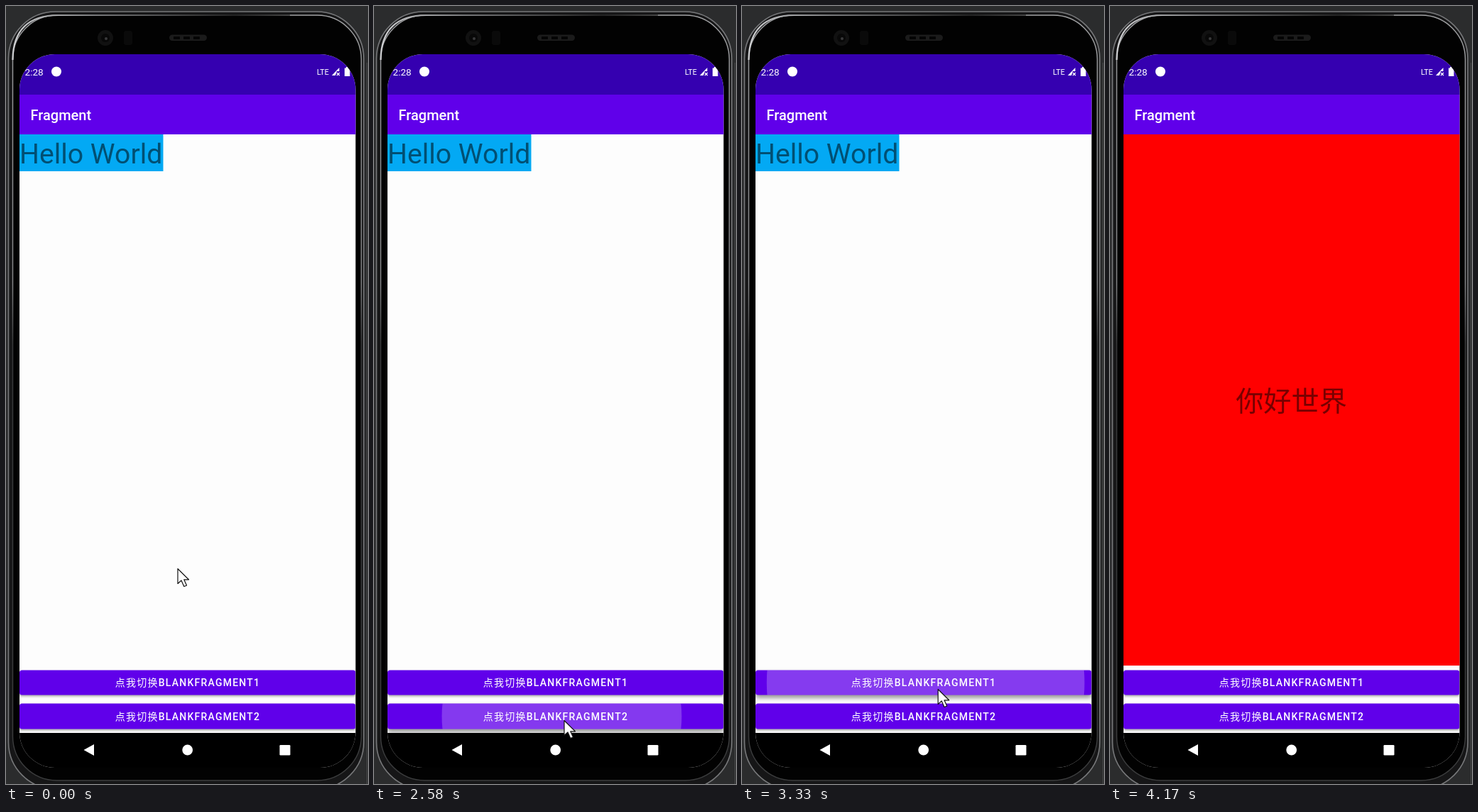
Animation of 510 by 1097 pixels, one loop 4330 ms. Source, as an HTML page:

```html
<!DOCTYPE html>
<html lang="zh-CN">
<head>
<meta charset="utf-8">
<title>Fragment switch</title>
<style>
  html, body { margin: 0; width: 100%; height: 100%; overflow: hidden; background: #2b2c2d; }
  svg { display: block; width: 510px; height: 1097px; }
  text { font-family: Roboto, "Noto Sans CJK SC", "Noto Sans CJK", sans-serif; fill: #fff; }
  .big { font-size: 39.2px; fill: rgba(0, 0, 0, .53); }
  .label { font-size: 14px; font-weight: 500; letter-spacing: 1.25px; text-anchor: middle; }
  .face { fill: #6000ea; filter: drop-shadow(0 2px 1.5px rgba(0, 0, 0, .32)); }
  .pressed .face { filter: drop-shadow(0 4px 3px rgba(0, 0, 0, .42)); }
  .ripple { fill: #fff; opacity: 0; }
</style>
</head>
<body>
<svg viewBox="0 0 510 1097">
  <defs>
    <linearGradient id="rim" x1="0" y1="0" x2="0" y2="1">
      <stop offset="0" stop-color="#a0a1a3"/>
      <stop offset=".35" stop-color="#8a8b8d"/>
      <stop offset=".43" stop-color="#3a3b3c"/>
      <stop offset="1" stop-color="#3c3d3e"/>
    </linearGradient>
    <linearGradient id="shine">
      <stop offset="0" stop-color="#d0d1d3"/>
      <stop offset=".3" stop-color="#77787a"/>
      <stop offset=".8" stop-color="#222"/>
      <stop offset="1" stop-color="#444"/>
    </linearGradient>
    <clipPath id="screen"><rect x="19" y="68" width="473.5" height="1006" rx="50"/></clipPath>
    <clipPath id="clip1"><rect x="19" y="936.5" width="473.5" height="35" rx="3.5"/></clipPath>
    <clipPath id="clip2"><rect x="19" y="983.5" width="473.5" height="36" rx="3.5"/></clipPath>
  </defs>

  <rect width="510" height="1097" fill="#2b2c2d"/>
  <rect x="3.5" y="8" width="500.5" height="1096" rx="66" fill="#161617" stroke="#77787a" stroke-width="1.6"/>
  <rect x="9.5" y="13" width="491" height="1079" rx="62" fill="#020202" stroke="url(#rim)" stroke-width="1.4"/>
  <path d="M9.5 76Q10 13 74 13H400" fill="none" stroke="url(#shine)" stroke-width="2.2"/>
  <path d="M508.5 80V1097" stroke="#48494a"/>

  <circle cx="140" cy="45" r="11" fill="#111"/>
  <circle cx="140" cy="45" r="6" fill="#080808"/>
  <circle cx="141" cy="46" r="2" fill="#3a3a3c"/>
  <rect x="166" y="35" width="12" height="20" rx="3" fill="#0a0a0a"/>
  <rect x="230" y="40.500" width="53" height="8.500" rx="4.200" fill="#1b1b1b"/>
  <path d="M236 45H278" stroke="#050505" stroke-width="4" stroke-dasharray="9 5"/>

  <g clip-path="url(#screen)">
    <rect x="19" y="68" width="474" height="1006" fill="#fdfdfd"/>
    <rect x="19" y="68" width="474" height="57" fill="#3500b0"/>
    <rect x="19" y="125" width="474" height="56" fill="#6000ea"/>

    <text x="26.500" y="97.500" font-size="13.600">2:28</text>
    <circle cx="71" cy="92.500" r="7" fill="#fff"/>
    <text x="438" y="96.500" font-size="10.800">LTE</text>
    <path d="M469.500 87V92H466L464 98H459Z" fill="#fff"/>
    <path d="M466 94l4 4m0-4l-4 4" stroke="#fff" stroke-width="1.200"/>
    <path d="M477 87.500h2v-1.500h3.500v1.500h2V99h-7.500z" fill="#fff"/>
    <text x="34.500" y="160.500" font-size="20" font-weight="500">Fragment</text>

    <g id="hello">
      <rect x="19" y="181" width="202.500" height="52" fill="#03a9f4"/>
      <text class="big" x="19" y="222.400">Hello World</text>
    </g>
    <g id="world">
      <rect x="19" y="181" width="474" height="749" fill="#f00"/>
      <text class="big" x="255.500" y="571" text-anchor="middle">你好世界</text>
    </g>

    <g id="btn1">
      <rect class="face" x="19" y="936.500" width="473.500" height="35" rx="3.500"/>
      <g clip-path="url(#clip1)"><circle class="ripple" cy="954"/></g>
      <text class="label" x="256" y="959.300">点我切换BLANKFRAGMENT1</text>
    </g>
    <g id="btn2">
      <rect class="face" x="19" y="983.500" width="473.500" height="36" rx="3.500"/>
      <g clip-path="url(#clip2)"><circle class="ripple" cy="1001.500"/></g>
      <text class="label" x="256" y="1007">点我切换BLANKFRAGMENT2</text>
    </g>

    <rect x="19" y="1025" width="474" height="50"/>
    <path d="M109.500 1049L124 1041V1057Z" fill="#fff"/>
    <circle cx="255.700" cy="1049" r="7.400" fill="#fff"/>
    <rect x="385.500" y="1042" width="15" height="14.500" rx="1.200" fill="#fff"/>
  </g>

  <path id="cursor" d="M0 .5V21.500L5 17L8.800 25.500L12.500 24L8.800 15.800H15.500Z" fill="#fff" stroke="#111" stroke-width="1.200" stroke-linejoin="round"/>
</svg>
<script>
  const LOOP = 4330, FPS = 12, MID = 255.5;
  const $ = id => document.getElementById(id);
  const clamp = v => Math.max(0, Math.min(1, v));
  const lerp = (a, b, p) => a + (b - a) * p;
  const smooth = p => p * p * (3 - 2 * p);

  // Pointer path: time, x, y
  const path = [
    [0, 242, 793], [80, 242, 793], [580, 256, 1040], [1000, 266, 1098],
    [1250, 270, 1098], [1700, 268, 985], [1850, 268, 958], [2170, 270, 960],
    [2333, 281, 985], [2417, 268, 1007], [2583, 268, 1007], [2750, 268, 1006],
    [3080, 277, 958], [3170, 277, 963], [3400, 276, 963], [3580, 276, 1002],
    [3830, 276, 1002], [4160, 288, 1100], [LOOP, 288, 1100]
  ];
  // Button presses: time, button, touch x
  const presses = [[1890, 1, 268], [2515, 2, 268], [3185, 1, 277], [3610, 2, 276]];
  const CLICK = 110, ENTER = 225, EXIT = 150;

  function moveCursor(t) {
    const i = Math.max(1, path.findIndex(k => k[0] >= t));
    const [a, b] = [path[i - 1], path[i]];
    const p = smooth(clamp((t - a[0]) / (b[0] - a[0])));
    $("cursor").setAttribute("transform", `translate(${lerp(a[1], b[1], p)} ${lerp(a[2], b[2], p)})`);
  }

  function drawButton(n, t) {
    const btn = $("btn" + n), circle = btn.querySelector(".ripple");
    const press = presses.find(([at, id]) => id === n && t >= at && t < at + ENTER + EXIT);
    btn.classList.toggle("pressed", !!press && t < press[0] + ENTER);
    if (!press) { circle.style.opacity = 0; return; }
    const age = t - press[0];
    const p = smooth(clamp(age / ENTER * 1.15));
    circle.setAttribute("cx", lerp(press[2], MID, p));
    circle.setAttribute("r", lerp(142, 238, p));
    circle.style.opacity = .23 * clamp(age / 70) * (1 - clamp((age - ENTER) / EXIT));
  }

  function draw(now) {
    const step = Math.floor((now % LOOP + 3.4) * FPS / 1000);
    const t = step * 1000 / FPS;
    const shown = presses.filter(([at]) => t >= at + CLICK).pop();
    const second = !!shown && shown[1] === 2;
    $("hello").style.display = second ? "none" : "";
    $("world").style.display = second ? "" : "none";
    drawButton(1, t);
    drawButton(2, t);
    moveCursor(Math.min(t, LOOP));
  }

  const start = performance.now();
  function tick() {
    draw(performance.now() - start);
    requestAnimationFrame(tick);
  }
  tick();
</script>
</body>
</html>
```
